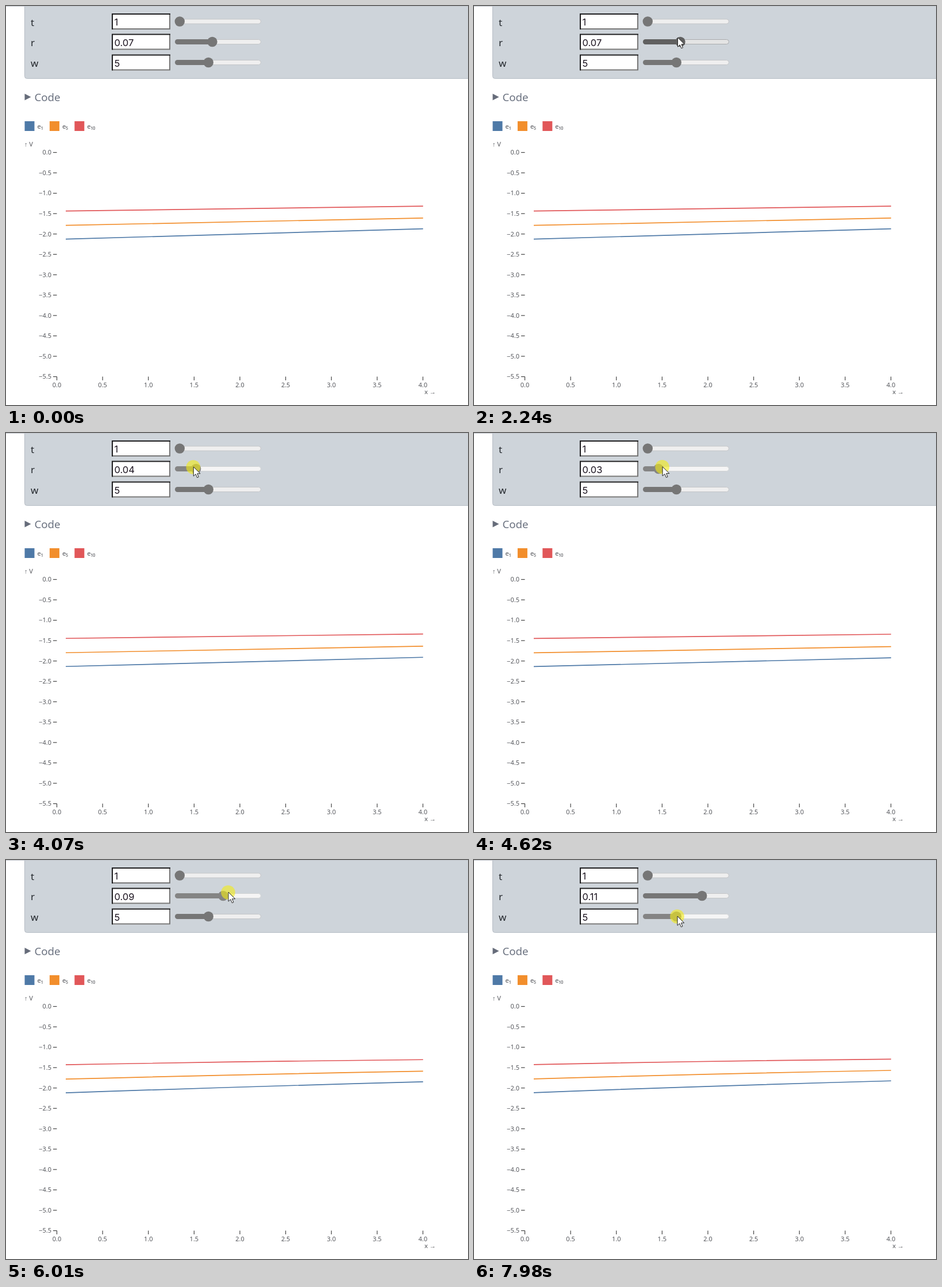
An HTML page for the animation above (8000 ms loop, 804 px wide and 696 px high).

```html
<!DOCTYPE html>
<html lang="en">
<head>
<meta charset="utf-8">
<title>Slider chart</title>
<style>
  html, body { margin: 0; width: 100%; height: 100%; overflow: hidden; background: #fff; }
  svg { display: block; }
  text { font-family: "Noto Sans", sans-serif; }
  .label { font-size: 17px; fill: #23272c; }
  .value { font: 16.5px Inter, sans-serif; fill: #1c1420; }
  .chart text { font-size: 11px; fill: #55575c; }
  .chart .tick { stroke: #444; stroke-width: 1.2; }
  .curve { fill: none; stroke-width: 1.7; }
</style>
</head>
<body>
<svg id="stage" width="804" height="696" viewBox="0 0 804 696">
  <path d="M32.5 0V122.5a4 4 0 0 0 4 4H806V0Z" fill="#ced4da" stroke="#b5bcc4"/>
  <path d="M0 .5H804" stroke="#c3c7ce"/>
  <g id="controls"></g>
  <path d="M32.5 153L43.5 158.7L32.5 164.4Z" fill="#666c7a"/>
  <text x="49.5" y="165.5" font-size="18.7" fill="#6b7280">Code</text>
  <g id="chart" class="chart">
    <text x="32" y="245">↑ V</text>
    <text x="748" y="677" text-anchor="end">x →</text>
  </g>
  <circle id="press" fill="rgb(243,235,20)" fill-opacity=".6"/>
  <path id="cursor" d="M0 0V16.2L3.8 12.7L6.4 18.8L9 17.7L6.5 11.8H11.8Z" fill="#fff" stroke="#222"/>
</svg>
<script>
const LOOP = 8000;
const TRACK = { left: 294, width: 150, min: 302.3, step: 9.45 };
const $ = id => document.getElementById(id);

function add(parent, tag, attrs, text) {
  const node = document.createElementNS("http://www.w3.org/2000/svg", tag);
  for (const key in attrs) node.setAttribute(key, attrs[key]);
  if (text !== undefined) node.textContent = text;
  return parent.appendChild(node);
}
function set(node, attrs) {
  for (const key in attrs) node.setAttribute(key, attrs[key]);
}

const PALETTE = {
  normal: { fill: "#767676", rest: "#efefef", edge: "#c3c5c8" },
  hover: { fill: "#606060", rest: "#e4e4e4", edge: "#a9abad" },
  active: { fill: "#848484", rest: "#f5f5f5", edge: "#d0d2d4" }
};

function makeSlider(name, y, value, thumbX) {
  const group = $("controls");
  add(group, "text", { x: 43, y: y + 7.5, class: "label" }, name);
  add(group, "rect", { x: 184, y: y - 14, width: 102, height: 28, fill: "#fff" });
  add(group, "path", { d: `M185 ${y + 13}H285V${y - 13}`, fill: "none", stroke: "#767676", "stroke-width": 2 });
  add(group, "path", { d: `M185 ${y + 14}V${y - 13}H286`, fill: "none", stroke: "#1d1d1f", "stroke-width": 2 });
  const text = add(group, "text", { x: 188.5, y: y + 7.3, class: "value" }, value);
  const rest = add(group, "rect", { x: TRACK.left + .5, y: y - 4, width: TRACK.width - 1, height: 8, rx: 4 });
  const fill = add(group, "rect", { x: TRACK.left, y: y - 4.5, height: 9, rx: 4.5 });
  const thumb = add(group, "circle", { cy: y, r: 8.7 });
  return { y, text, rest, fill, thumb, thumbX };
}
const sliders = [
  makeSlider("t", 27, "1", 302.3),
  makeSlider("r", 62.5, "0.07", 359.5),
  makeSlider("w", 98.5, "5", 352.3)
];

const chart = $("chart");
const series = [
  { name: "e₁", color: "#4e79a7", start: 408.1, startSlope: -21, end: 394.7, endSlope: -86 },
  { name: "e₅", color: "#f28e2c", start: 384.1, startSlope: -21, end: 374.7, endSlope: -70 },
  { name: "e₁₀", color: "#e15759", start: 359.1, startSlope: -21, end: 352.4, endSlope: -46 }
];
series.forEach((s, i) => {
  const x = 32.5 + 43.4 * i;
  add(chart, "rect", { x, y: 201, width: 17, height: 17, fill: s.color });
  add(chart, "text", { x: x + 22, y: 214 }, s.name);
  s.path = add(chart, "path", { class: "curve", stroke: s.color });
});
for (let i = 0; i <= 11; i++) {
  const y = 255.5 + i * 35.55;
  add(chart, "path", { class: "tick", d: `M82 ${y}H88.5` });
  add(chart, "text", { x: 79, y: y + 3.8, "text-anchor": "end" }, (i ? "−" : "") + (i / 2).toFixed(1));
}
for (let i = 0; i <= 8; i++) {
  const x = 88.5 + i * 79.63;
  add(chart, "path", { class: "tick", d: `M${x} 646.5V653` });
  add(chart, "text", { x, y: 665, "text-anchor": "middle" }, (i / 2).toFixed(1));
}

// Pointer path: time, x, y
const route = [
  [320, 646, 587], [600, 430, 300], [810, 282, 120], [950, 300, 80],
  [1090, 354, 63], [1230, 354.5, 55], [2640, 354.5, 55], [2920, 361.5, 59],
  [3590, 361.5, 59], [4280, 311, 59], [4410, 311, 59], [4830, 345, 58.5],
  [5240, 345, 58.5], [6010, 387, 56], [6080, 387.5, 56], [6420, 398.5, 52.5],
  [7220, 398.5, 52.5], [7570, 354, 98], [LOOP, 354, 98]
];
function pointerAt(time) {
  const i = Math.max(1, route.findIndex(p => p[0] >= time));
  const [t0, x0, y0] = route[i - 1], [t1, x1, y1] = route[i];
  const k = Math.max(0, (time - t0) / (t1 - t0));
  return { x: x0 + (x1 - x0) * k, y: y0 + (y1 - y0) * k };
}

function pressAt(time) {
  if (time >= 2420 && time < 2640) return { slider: 1, radius: 7 };
  if (time >= 3320 && time < 7220) return { slider: 1, radius: 12.3 };
  if (time >= 7840) return { slider: 2, radius: 12.3 };
  return null;
}

function rateSteps(time) {
  if (time < 3590) return 6;
  const dragged = pointerAt(Math.min(time - 100, 7100)).x - 1.5;
  return Math.round((dragged - TRACK.min) / TRACK.step);
}

function drawSlider(slider, state) {
  const colors = PALETTE[state];
  set(slider.rest, { fill: colors.rest, stroke: colors.edge });
  set(slider.fill, { fill: colors.fill, width: slider.thumbX - TRACK.left });
  set(slider.thumb, { fill: colors.fill, cx: slider.thumbX });
}

function draw(time) {
  const pointer = pointerAt(time), press = pressAt(time);
  const steps = rateSteps(time), rate = (steps + 1) / 100;

  sliders[1].thumbX = TRACK.min + steps * TRACK.step;
  sliders[1].text.textContent = rate.toFixed(2);
  sliders.forEach((slider, i) => {
    const over = time >= 320 && Math.abs(pointer.y - slider.y) < 9
      && pointer.x >= TRACK.left && pointer.x <= TRACK.left + TRACK.width;
    const state = press ? (press.slider === i ? "active" : "normal") : over ? "hover" : "normal";
    drawSlider(slider, state);
  });

  for (const s of series) {
    const y0 = s.start + s.startSlope * rate, y1 = s.end + s.endSlope * rate;
    const bend = (y0 + y1) / 2 - 16 * rate;
    set(s.path, { d: `M104 ${y0}Q415 ${bend} 725.8 ${y1}` });
  }

  set($("press"), { cx: pointer.x - .5, cy: pointer.y + .5, r: press ? press.radius : 0 });
  set($("cursor"), {
    transform: `translate(${pointer.x} ${pointer.y})`,
    visibility: time < 320 ? "hidden" : "visible"
  });
}

const begin = performance.now();
function frame() {
  draw((performance.now() - begin) % LOOP);
  requestAnimationFrame(frame);
}
frame();
</script>
</body>
</html>
```
